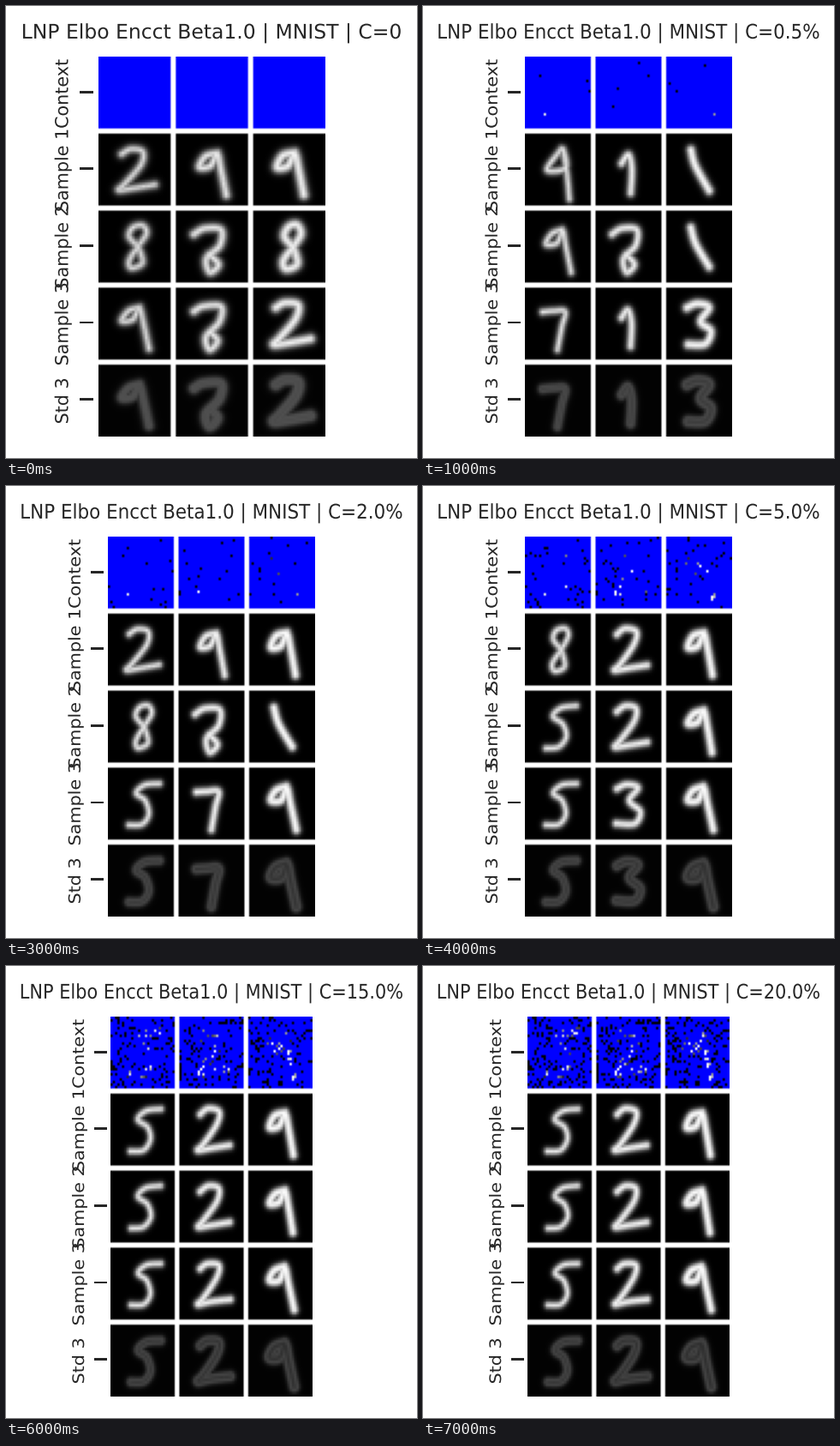
These frames come from a looping animation (480 by 527 pixels, 8 s). A matplotlib script:

```python
import numpy as np
import matplotlib.pyplot as plt
from matplotlib.animation import FuncAnimation
from matplotlib.patches import PathPatch, Rectangle
from matplotlib.textpath import TextPath
from matplotlib.transforms import Affine2D

W, H = 480, 527
INK = "#262626"
FONT = {"family": "DejaVu Sans"}
CELL, PITCH, PX = 28, 30, 2.987
TOP, MID = 59.5, 240
LEVELS = [0, 0.005, 0.01, 0.02, 0.05, 0.1, 0.15, 0.2]
LABELS = ["Context", "Sample 1", "Sample 2", "Sample 3", "Std 3"]
YY, XX = np.mgrid[0:CELL, 0:CELL] + 0.5

# key points of each pen path on the 28 x 28 cell
PATHS = {
    "1": [(11, 11.5), (14, 8.5), (15.3, 14), (15, 23)],
    "2": [(9, 8), (12.5, 6), (17.2, 7), (16.3, 12), (10.5, 19.5), (8, 22), (14, 21.3), (22, 20)],
    "3": [(9, 8), (13.5, 6.3), (18, 8), (14.5, 13), (19, 17), (16.5, 21.7), (9, 22)],
    "4": [(15.5, 6), (9.3, 14), (17.5, 13.2), (16, 6), (18, 16), (19, 25.5)],
    "5": [(22, 6), (15.5, 6.7), (12, 10), (16, 13), (17.5, 18), (14.5, 22), (9, 22.5)],
    "7": [(7.5, 9.3), (12, 9), (17, 9.5), (15.8, 15.6), (14, 24)],
    "8": [(15.5, 14), (12, 10), (13.5, 6.5), (17, 5.7), (18.5, 9), (15.5, 14), (12, 19.5),
          (13, 22.5), (17, 20.5), (15.5, 14)],
    "9": [(16, 7.5), (11.5, 9), (9, 13), (13.5, 12.5), (16, 8), (17.5, 14), (19.7, 24)],
    # a seven with a looped foot, and a slanted bar
    "?": [(7, 9), (11, 7), (17.5, 7.5), (17, 13.5), (11.8, 19), (13, 24), (16.4, 21), (13, 17)],
    "/": [(10.5, 6.5), (12.5, 13), (18, 22)],
}
# the three samples of each step, one figure per column
GUESSES = ["299 8?8 9?2", "41/ 9?/ 713", "219 8?/ 579", "299 8?/ 579",
           "829 529 539", "329 529 529", "529 529 529", "529 529 529"]
ANSWER = "529"


def spline(pts, n=100):
    """Catmull-Rom curve through the points."""
    p = np.vstack([pts[:1], pts, pts[-1:]])
    t = np.linspace(0, len(pts) - 1, n)
    i = np.minimum(t.astype(int), len(pts) - 2)
    u = (t - i)[:, None]
    a, b, c, d = p[i], p[i + 1], p[i + 2], p[i + 3]
    return 0.5 * (2 * b + (c - a) * u + (2 * a - 5 * b + 4 * c - d) * u**2
                  + (3 * b - a - 3 * c + d) * u**3)


def paint(figure, radius, soft, wobble=0, seed=0):
    pts = np.array(PATHS[figure], float)
    pts += np.random.default_rng(seed).normal(0, 1, pts.shape) * wobble
    curve = spline(pts)
    d = np.hypot(XX[..., None] - curve[:, 0], YY[..., None] - curve[:, 1]).min(-1)
    return np.minimum(1.05 / (1 + np.exp((d - radius) / soft)), 1)


ORDERS = [np.random.default_rng(c + 5).permutation(CELL * CELL) for c in range(3)]
TRUTHS = [paint(figure, 1.2, 0.35) for figure in ANSWER]


def context(step, col):
    img = np.zeros((CELL * CELL, 3))
    img[:, 2] = 1
    seen = ORDERS[col][:round(LEVELS[step] * CELL * CELL)]
    value = TRUTHS[col].ravel()[seen]
    img[seen] = np.where(value > 0.15, value, 0)[:, None]
    return img.reshape(CELL, CELL, 3)


def sheet(step):
    grid = np.ones((5 * PITCH - 2, 3 * PITCH - 2, 3))
    doubt = 1 / (1 + step)
    for col in range(3):
        cells = [context(step, col)]
        for row, guess in enumerate(GUESSES[step].split()):
            p = paint(guess[col], 1.1 + 0.25 * col, 0.55 + 0.15 * doubt,
                      0.15, 10 * row + col)
            cells.append(p[..., None])
        cells.append(0.01 + 0.8 * p * (1 - p) + (0.15 + 0.12 * doubt) * p**2)
        for row, cell in enumerate(cells):
            y, x = row * PITCH, col * PITCH
            grid[y:y + CELL, x:x + CELL] = cell.reshape(CELL, CELL, -1)
    return np.clip(grid, 0, 1)


SHEETS = [sheet(s) for s in range(len(LEVELS))]

fig = plt.figure(figsize=(W / 100, H / 100), dpi=100, facecolor="white")
ax = fig.add_axes([0, 0, 1, 1])


def put_text(path, place, page):
    ax.add_patch(PathPatch(path, fc=INK, lw=0, transform=place + page))


def update(step):
    ax.clear()
    ax.axis("off")
    level = LEVELS[step]
    amount = f"{100 * level:.1f}%" if level else "0"
    title = TextPath((0, 0), f"LNP Elbo Encct Beta1.0 | MNIST | C={amount}",
                     size=23.33, prop=FONT)
    box = title.get_extents()

    # the page is as wide as its title and is squeezed into the stage
    squeeze = W / (box.width + 39)
    half = (3 * PITCH - 2) * PX / 2 * squeeze
    bottom = TOP + (5 * PITCH - 2) * PX
    ax.imshow(SHEETS[step], extent=(MID - half, MID + half, bottom, TOP),
              aspect="auto", interpolation="hanning")
    ax.set_xlim(0, W)
    ax.set_ylim(H, 0)

    page = Affine2D().scale(squeeze, 1).translate(MID, 0) + ax.transData
    centre = (box.x0 + box.x1) / 2
    put_text(title, Affine2D().translate(-centre, 0).scale(1, -1).translate(0.4, 37.9), page)
    for row, label in enumerate(LABELS):
        y = 100.2 + row * PITCH * PX
        ax.add_patch(Rectangle((-153.5, y - 1.4), 16.8, 2.8, fc=INK, lw=0, transform=page))
        path = TextPath((0, 0), label, size=20.7, prop=FONT)
        ext = path.get_extents()
        place = Affine2D().translate(-(ext.x0 + ext.x1) / 2, 0).scale(1, -1)
        put_text(path, place.rotate_deg(-90).translate(-166.5, y + 1.9), page)
    return []


anim = FuncAnimation(fig, update, frames=len(LEVELS), interval=1000, repeat=True,
                     repeat_delay=0, init_func=lambda: [])
plt.show()
```
